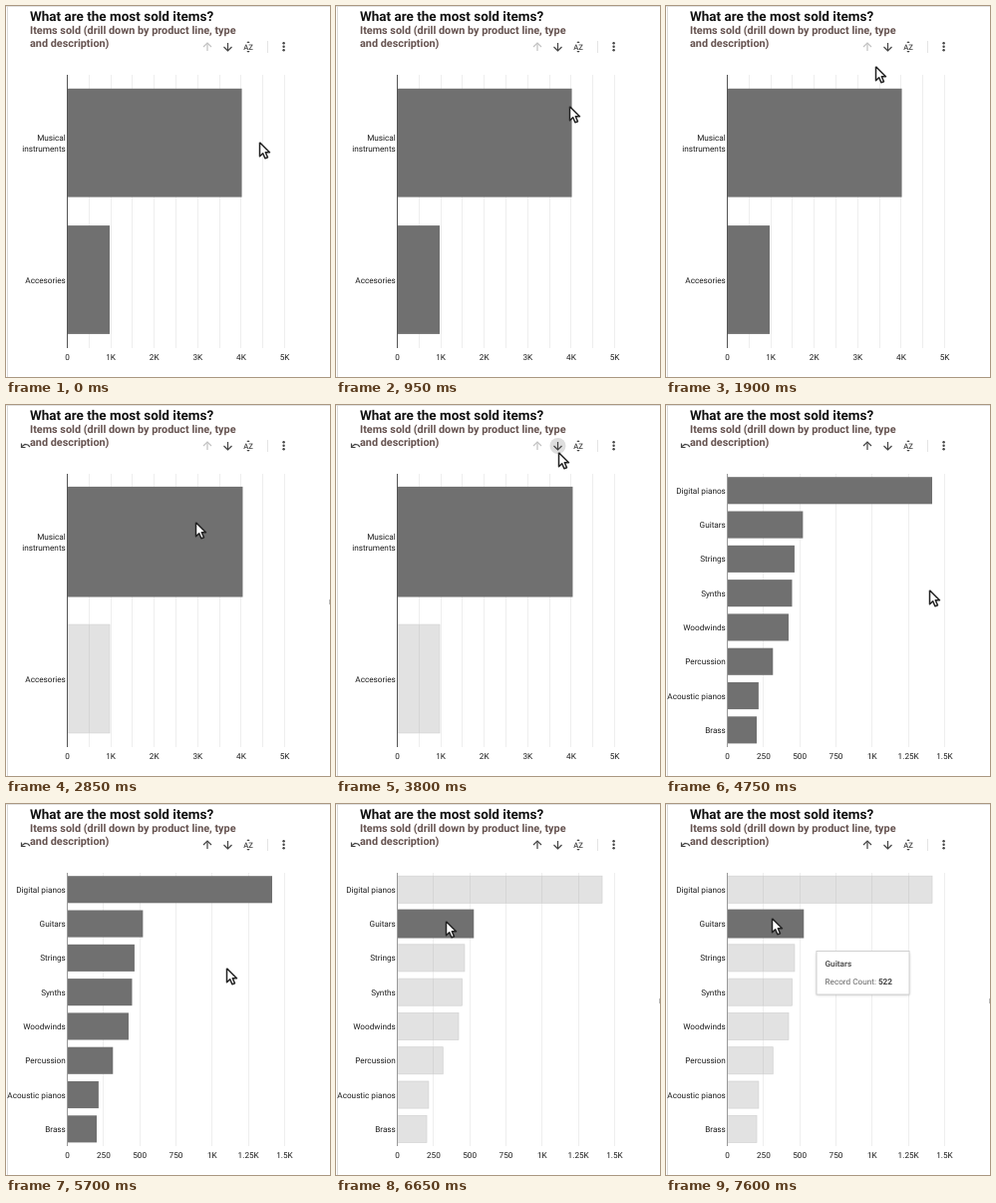
Animation, 325 px wide and 372 px high, one loop 8 s. Source, as an HTML page with a canvas:

```html
<!DOCTYPE html>
<html lang="en">
<head>
<meta charset="utf-8">
<title>Most sold items</title>
<style>
  html, body { margin: 0; width: 100%; height: 100%; overflow: hidden; background: #fff; }
  canvas { display: block; width: 325px; height: 372px; }
</style>
</head>
<body>
<canvas id="stage"></canvas>
<script>
const W = 325, H = 372, LOOP = 8000, HOLD = 950;
const AXIS = 61.5, TOP = 69, BOTTOM = 343, SPAN = 218;
const FONT = 'Roboto, "Open Sans", sans-serif';
const DARK = '#1c1c1c', LABEL = 8.2;

const canvas = document.getElementById('stage');
const ctx = canvas.getContext('2d');
const scale = window.devicePixelRatio || 1;
canvas.width = Math.round(W * scale);
canvas.height = Math.round(H * scale);
ctx.textRendering = 'geometricPrecision';

const lines = {
  ticks: ['0', '1K', '2K', '3K', '4K', '5K'], gridSteps: 10, axis: '#555', max: 5000,
  top: 82.8, pitch: 137.3, thick: 108.8,
  rows: [['Musical instruments', 4015], ['Accesories', 975]]
};
const types = {
  ticks: ['0', '250', '500', '750', '1K', '1.25K', '1.5K'], gridSteps: 6, axis: '#999', max: 1500,
  top: 72.2, pitch: 34.3, thick: 27.1,
  rows: [['Digital pianos', 1414], ['Guitars', 522], ['Strings', 464], ['Synths', 447],
    ['Woodwinds', 423], ['Percussion', 315], ['Acoustic pianos', 216], ['Brass', 203]]
};

// One screen state per 950 ms of screen capture.
const states = [
  { chart: lines, cursor: [254, 136] },
  { chart: lines, cursor: [234, 100] },
  { chart: lines, cursor: [210, 60] },
  { chart: lines, cursor: [190, 117], picked: 0, undo: true, mark: true },
  { chart: lines, cursor: [223, 47], picked: 0, undo: true, hover: true },
  { chart: types, cursor: [264, 185], undo: true, up: true },
  { chart: types, cursor: [221, 164], undo: true, up: true },
  { chart: types, cursor: [110, 117], picked: 1, undo: true, up: true, mark: true },
  { chart: types, cursor: [106, 114], picked: 1, undo: true, up: true, mark: true, tooltip: true }
];

function text(str, x, y, size, color = DARK, weight = 400, align = 'left') {
  ctx.font = `${weight} ${size}px ${FONT}`;
  ctx.textAlign = align;
  ctx.fillStyle = color;
  ctx.fillText(str, x, y);
}

function path(points, color, width = 1) {
  ctx.beginPath();
  points.forEach(([x, y]) => ctx.lineTo(x, y));
  ctx.strokeStyle = color;
  ctx.lineWidth = width;
  ctx.stroke();
}

function polygon(points, color) {
  ctx.beginPath();
  points.forEach(([x, y]) => ctx.lineTo(x, y));
  ctx.closePath();
  ctx.fillStyle = color;
  ctx.fill();
}

function disc(x, y, r, color) {
  ctx.beginPath();
  ctx.arc(x, y, r, 0, Math.PI * 2);
  ctx.fillStyle = color;
  ctx.fill();
}

function triangle(x, y, dir) {
  polygon([[x - 1.7, y], [x + 1.7, y], [x, y + 1.8 * dir]], '#444');
}

function arrow(x, y, dir, color) {
  path([[x, y - 4 * dir], [x, y + 4 * dir]], color, 1.2);
  path([[x - 4, y], [x, y + 4 * dir], [x + 4, y]], color, 1.2);
}

function drawHeader(s) {
  text('What are the most sold items?', 24, 15, 13.5, '#111', 700);
  text('Items sold (drill down by product line, type', 24, 28.4, 10.85, '#65524f', 700);
  text('and description)', 24, 41.4, 10.85, '#65524f', 700);

  if (s.undo) {
    path([[24, 42], [22, 40], [19, 39.5], [16, 41.5]], '#444', 1.2);
    path([[15.5, 38.5], [15.5, 42.5], [19.5, 42.5]], '#444', 1.2);
  }
  if (s.hover) disc(222.5, 41, 8, '#dedede');
  arrow(202, 41, -1, s.up ? '#444' : '#c2c2c2');
  arrow(222.5, 41, 1, '#444');
  text('AZ', 243, 43.5, 7.6, '#444', 500, 'center');
  triangle(243, 37, -1);
  triangle(243, 45, 1);
  path([[262.5, 35], [262.5, 47]], '#e4e4e4');
  for (const y of [37.3, 40.8, 44.3]) disc(278.6, y, 1.2, '#444');
}

function drawBar(y, width, thick, faded, picked) {
  const grow = picked ? 0.9 : 0;
  ctx.fillStyle = faded ? 'rgba(112,112,112,.2)' : '#707070';
  ctx.fillRect(AXIS, y - grow, width + grow, thick + 2 * grow);
  if (!faded) return;
  ctx.strokeStyle = '#d2d2d2';
  ctx.lineWidth = 0.7;
  ctx.strokeRect(AXIS, y, width, thick);
}

function drawChart({ chart, picked }) {
  for (let i = 1; i <= chart.gridSteps; i++) {
    const x = Math.round(AXIS + SPAN * i / chart.gridSteps - 0.5) + 0.5;
    path([[x, TOP], [x, BOTTOM]], '#eeeeee');
  }

  chart.rows.forEach(([name, value], i) => {
    const y = chart.top + i * chart.pitch;
    const faded = picked !== undefined && picked !== i;
    drawBar(y, SPAN * value / chart.max, chart.thick, faded, picked === i);

    const words = chart === lines ? name.split(' ') : [name];
    const base = y + chart.thick / 2 + 3 - (words.length - 1) * 5;
    words.forEach((word, n) => text(word, 59.8, base + n * 10.3, LABEL, DARK, 400, 'right'));
  });

  path([[AXIS, TOP], [AXIS, BOTTOM]], chart.axis);
  chart.ticks.forEach((label, i) =>
    text(label, AXIS + SPAN * i / (chart.ticks.length - 1), 355, LABEL, DARK, 400, 'center'));
}

function drawTooltip() {
  ctx.save();
  ctx.shadowColor = 'rgba(0,0,0,.22)';
  ctx.shadowBlur = 3 * scale;
  ctx.shadowOffsetY = scale;
  ctx.fillStyle = '#fff';
  ctx.fillRect(151, 147.5, 93, 43.5);
  ctx.restore();
  ctx.strokeStyle = '#d0d0d0';
  ctx.lineWidth = 1;
  ctx.strokeRect(151, 147.5, 93, 43.5);
  text('Guitars', 159.5, 163, LABEL, '#555', 700);
  const label = 'Record Count: ';
  text(label, 159.5, 181, LABEL, '#666');
  text('522', 159.5 + ctx.measureText(label).width, 181, LABEL, '#444', 700);
}

function drawCursor([x, y]) {
  const shape = [[0, 0], [0, 14], [3.2, 11], [5.4, 16], [8, 14.9], [5.8, 10], [10, 10], [0, 0]];
  ctx.save();
  ctx.translate(x + 0.5, y + 0.8);
  ctx.lineJoin = 'round';
  polygon(shape, '#fff');
  path(shape, '#222', 1.5);
  ctx.restore();
}

function draw(now) {
  const s = states[Math.floor((now % LOOP) / HOLD)];
  ctx.setTransform(scale, 0, 0, scale, 0, 0);
  ctx.fillStyle = '#fff';
  ctx.fillRect(0, 0, W, H);
  path([[0, 0.5], [W, 0.5]], '#e2e2e2');
  path([[1.5, 0], [1.5, H]], '#dcdcdc');
  drawHeader(s);
  drawChart(s);
  if (s.mark) path([[324.5, 195], [324.5, 200]], '#bbb');
  if (s.tooltip) drawTooltip();
  drawCursor(s.cursor);
}

const start = performance.now();
function tick() {
  draw(performance.now() - start);
  requestAnimationFrame(tick);
}
tick();
</script>
</body>
</html>
```
